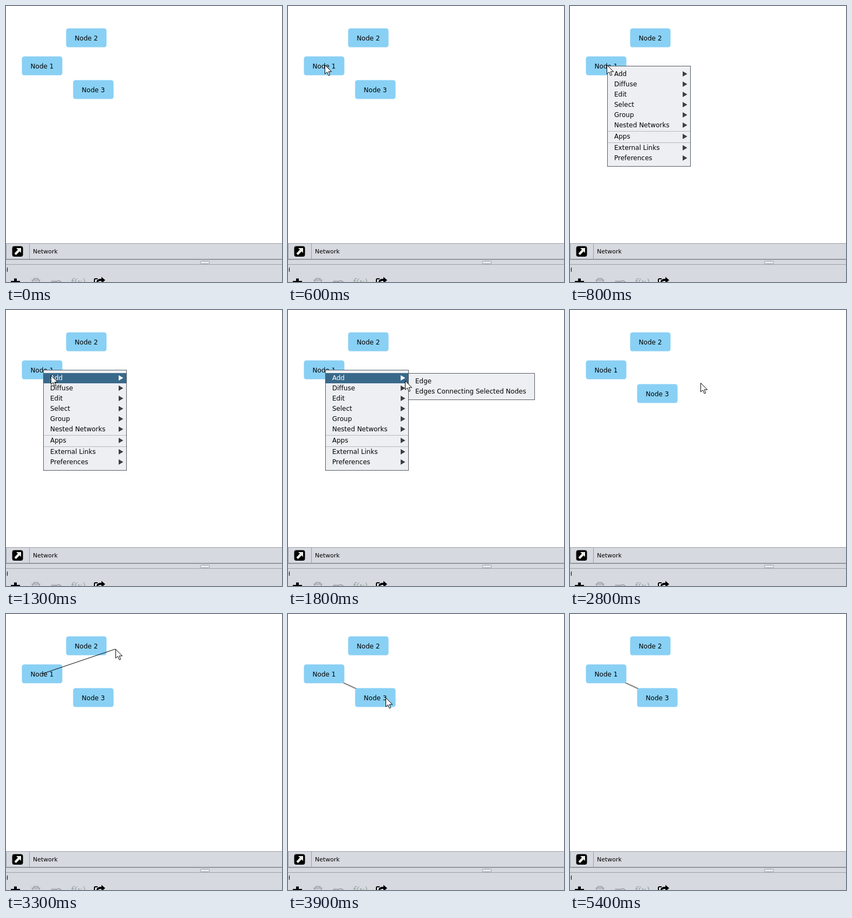
An HTML page for the animation above (5.6 s loop, 512 by 512 pixels).

```html
<!DOCTYPE html>
<html lang="en">
<head>
<meta charset="utf-8">
<title>Adding an edge</title>
<style>
  html, body { margin: 0; width: 100%; height: 100%; overflow: hidden; background: #fff; }
  svg { display: block; width: 100vw; height: 100vh; }
  text { font-family: "DejaVu Sans", sans-serif; font-size: 12px; fill: #000; text-rendering: optimizeSpeed; }
  .small { font-size: 11px; }
  .formula { font: italic 16px "DejaVu Serif", serif; fill: #94a09b; }
  .node { fill: #89d0f5; }
  .panel { fill: #edeff2; stroke: #55595f; }
  .rule { stroke: #b4b8bf; }
  .mark { fill: #3b3e42; }
  .pick { fill: none; }
  .on .pick { fill: #39698a; }
  .on text, .on .mark { fill: #fff; }
</style>
</head>
<body>
<svg viewBox="0 0 512 512">
  <line id="edge" x1="67" y1="111" x2="162" y2="155" stroke="#848484" stroke-width="2"/>
  <g id="nodes"></g>
  <line id="preview" x1="67" y1="111" stroke="#000"/>

  <rect y="440" width="512" height="72" fill="#d6d9df"/>
  <path d="M0 440.5H512M.5 440V470M43.5 441V470M0 479.5H512" fill="none" stroke="#9a9ea6"/>
  <path d="M0 470H512" stroke="#92969d" stroke-width="2"/>
  <rect x="360.5" y="473.5" width="17" height="4.500" rx="2" fill="#eceef1" stroke="#92969d"/>
  <text class="small" x="50" y="459">Network</text>
  <text class="small" x="4" y="493" text-anchor="end">el</text>
  <rect x="11.500" y="445.500" width="20" height="19.500" rx="4"/>
  <path d="M19 449H28V458L25.300 455.300L18.500 462L15.500 459L22 452Z" fill="#eceee8"/>

  <path d="M15 505.500H20V510H26V512H9V510H15Z"/>
  <g fill="none" stroke="#9a9da1" stroke-width="1.500">
    <path d="M47 508.500H64M51.500 508V505.500H59.500V508M49.500 509V512M61.500 509V512M54 511V512M57 511V512"/>
    <path d="M84.500 512V510.500H88.500V512M88.500 510.500H92.500V512M94 512Q94.500 509.500 97.500 509.500T101 512M101 511.500H103"/>
  </g>
  <text class="formula" x="120" y="518">f(x)</text>
  <path d="M164 512V508Q164 506 166 506H170" fill="none" stroke="#000" stroke-width="2"/>
  <path d="M168 512Q168 506 177 506V502.500L184 508.500L180 512H177V510Q172 509.500 170.500 512Z"/>

  <g id="menu"></g>
  <g id="submenu"></g>
  <path id="cursor" d="M.5 .5V17L4.500 13.400L7.200 20L9.800 18.900L7.200 12.800H12.800Z"
        fill="#fff" stroke="#000"/>
</svg>

<script>
const LOOP = 5600, STEP = 100, ROW = 19;
const $ = id => document.getElementById(id);

function add(parent, tag, attrs, text) {
  const el = document.createElementNS('http://www.w3.org/2000/svg', tag);
  for (const key in attrs) el.setAttribute(key, attrs[key]);
  if (text) el.textContent = text;
  return parent.appendChild(el);
}

function addNode(name, x, y) {
  add($('nodes'), 'rect', { class: 'node', x, y, width: 75, height: 35, rx: 4.5 });
  add($('nodes'), 'text', { x: x + 37.5, y: y + 22, 'text-anchor': 'middle' }, name);
}

// Draws a panel with groups of rows, split by rules, and returns the first row.
function addMenu(menu, x, y, width, groups, hasArrows) {
  const panel = add(menu, 'rect', { class: 'panel', x, y, width });
  const left = x + 0.5, right = x + width - 0.5;
  let top = y + 5.5;
  groups.forEach((labels, i) => {
    if (i) {
      add(menu, 'path', { class: 'rule', d: `M${left} ${top + 1.5}H${right}` });
      top += 2;
    }
    for (const label of labels) {
      const row = add(menu, 'g', { class: 'row' });
      add(row, 'rect', { class: 'pick', x: left, y: top, width: right - left, height: ROW });
      add(row, 'text', { x: left + 12, y: top + 13 }, label);
      if (hasArrows) add(row, 'path', { class: 'mark', d: `M${right - 14} ${top + 4}l8.5 5l-8.5 5Z` });
      top += ROW;
    }
  });
  panel.setAttribute('height', top + 5.5 - y);
  return menu.querySelector('.row');
}

addNode('Node 2', 111.5, 41.5);
addNode('Node 1', 29.5, 93.5);
addNode('Node 3', 124.5, 137.5);

const addRow = addMenu($('menu'), 69.5, 111.5, 154, [
  ['Add', 'Diffuse', 'Edit', 'Select', 'Group', 'Nested Networks'],
  ['Apps'],
  ['External Links', 'Preferences']
], true);
const edgeRow = addMenu($('submenu'), 223.5, 117.5, 234, [
  ['Edge', 'Edges Connecting Selected Nodes']
]);

// Each pointer move slows down by its power and continues from the last one.
const origin = { x: 90, y: 0 };
const moves = [
  { from: 100, to: 600, x: 68, y: 109, power: 1.5 },
  { from: 1100, to: 1300, x: 83, y: 121, power: 1 },
  { from: 1600, to: 2000, x: 231, y: 132, power: 3.4 },
  { from: 2100, to: 2300, x: 242, y: 135, power: 2 },
  { from: 3000, to: 3400, x: 190, y: 42, power: 1 },
  { from: 3500, to: 3700, x: 181, y: 155, power: 1 },
  { from: 4800, to: 5400, x: 65, y: -25, power: 1 }
];

function pointerAt(t) {
  let { x, y } = origin;
  for (const move of moves) {
    const u = Math.min(1, Math.max(0, (t - move.from) / (move.to - move.from)));
    const k = 1 - (1 - u) ** move.power;
    x += (move.x - x) * k;
    y += (move.y - y) * k;
  }
  return [Math.round(x), Math.round(y)];
}

const show = (el, on) => el.setAttribute('visibility', on ? 'visible' : 'hidden');

function draw(time) {
  const t = Math.floor(time / STEP) * STEP;
  const within = (from, to) => t >= from && t < to;
  const [x, y] = pointerAt(t);

  $('cursor').setAttribute('transform', `translate(${x} ${y})`);
  $('preview').setAttribute('x2', x);
  $('preview').setAttribute('y2', y);
  show($('cursor'), within(100, 5400));
  show($('preview'), within(3100, 3900));
  show($('edge'), t >= 3900);
  show($('menu'), within(800, 2800));
  show($('submenu'), within(1500, 2800));
  addRow.classList.toggle('on', within(1200, 2800));
  edgeRow.classList.toggle('on', within(1900, 2800));
}

const start = performance.now();
function tick() {
  draw((performance.now() - start) % LOOP);
  requestAnimationFrame(tick);
}
tick();
</script>
</body>
</html>
```
